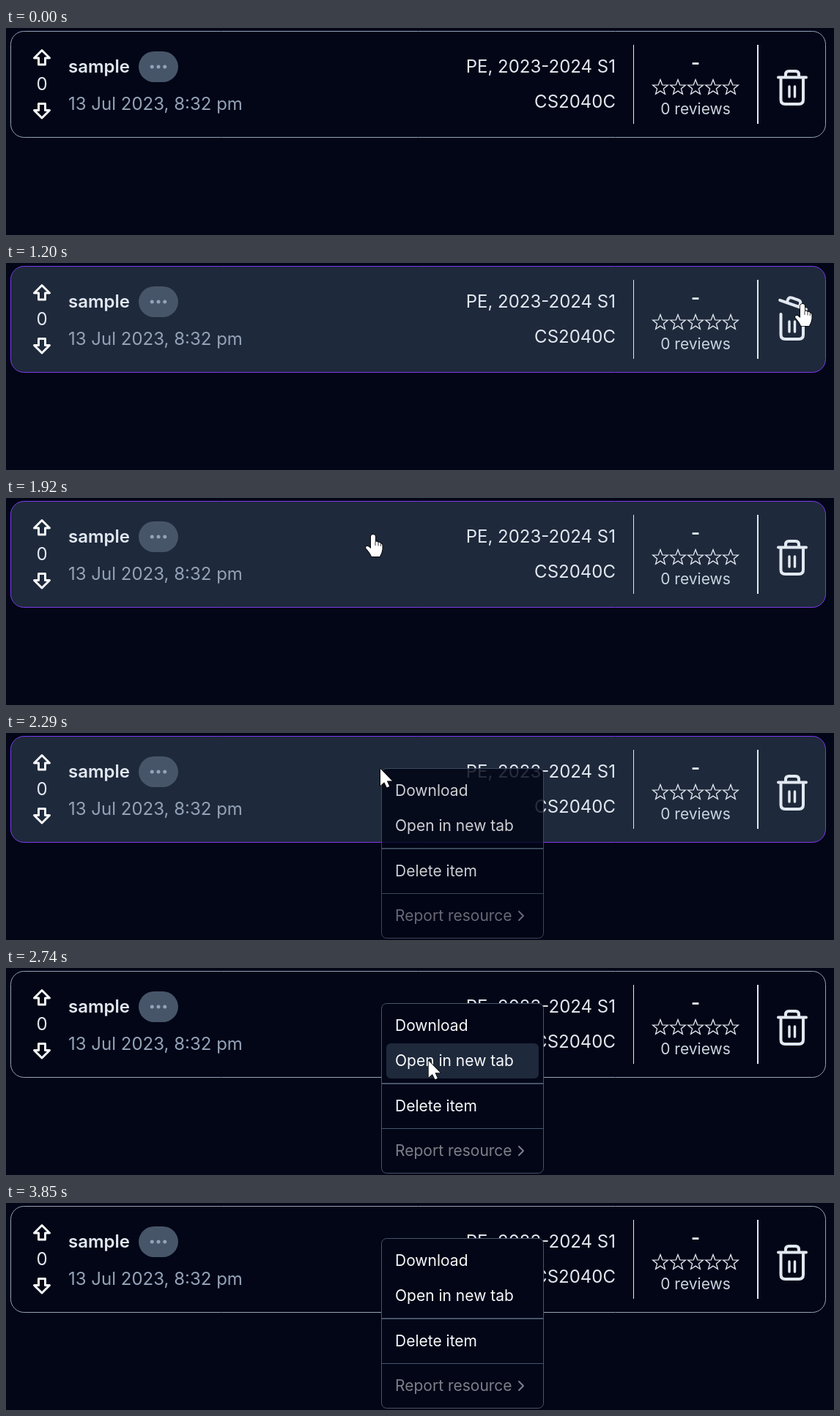
Animation, 1130 px wide and 283 px high, one loop 4.61 s. Source, as an HTML page with a canvas:

```html
<!DOCTYPE html>
<html lang="en">
<head>
<meta charset="utf-8">
<title>Resource card</title>
<style>
  html, body { margin: 0; width: 100%; height: 100%; overflow: hidden; background: #020617; }
  canvas { display: block; width: 1130px; height: 283px; }
</style>
</head>
<body>
<canvas id="stage"></canvas>
<script>
const W = 1130, H = 283, LOOP = 4610;
const canvas = document.getElementById('stage');
const ctx = canvas.getContext('2d');
const ratio = window.devicePixelRatio || 1;
canvas.width = Math.round(W * ratio);
canvas.height = Math.round(H * ratio);

const INK = '#f8fafc', SOFT = '#e2e8f0', MUTED = '#94a3b8', LINE = '#475569';
const BASE = [2, 6, 23], HOVER = [30, 41, 59];
const EDGE = [148, 163, 184], VIOLET = [124, 58, 237];

// Pointer path: time, x, y
const path = [
  [710, 969, 259], [790, 979, 200], [870, 996, 145], [960, 1035, 96],
  [1060, 1080, 66], [1200, 1087, 56], [1240, 1087, 56], [1330, 1060, 72],
  [1450, 900, 88], [1600, 740, 85], [1740, 637, 72], [1860, 520, 54],
  [1920, 501, 50], [2050, 501, 50], [2150, 504, 33], [2250, 511, 49],
  [2500, 511, 49], [2600, 521, 72], [2750, 580, 130], [2850, 611, 163],
  [2960, 622, 195], [3740, 622, 195], [3810, 624, 240], [3850, 625, 262]
];
const MENU_AT = 2260;

const menuItems = [
  { label: 'Download', top: 55, base: 86 },
  { label: 'Open in new tab', top: 103, base: 134 },
  { label: 'Delete item', top: 165, base: 196 }
];

const smooth = p => p * p * (3 - 2 * p);
const ramp = (t, start, length) => smooth(Math.min(1, Math.max(0, (t - start) / length)));
const mix = (a, b, p) => `rgb(${a.map((v, i) => Math.round(v + (b[i] - v) * p)).join(',')})`;

// Monotone cubic interpolation, so pauses stay still
function slope(i, k) {
  if (i < 1 || i >= path.length - 1) return 0;
  const rate = j => (path[j + 1][k] - path[j][k]) / (path[j + 1][0] - path[j][0]);
  const a = rate(i - 1), b = rate(i);
  return a * b <= 0 ? 0 : 2 * a * b / (a + b);
}

function pointer(t) {
  const last = path.length - 1;
  if (t < path[0][0] || t >= path[last][0]) return null;
  let i = 0;
  while (t >= path[i + 1][0]) i++;
  const span = path[i + 1][0] - path[i][0], u = (t - path[i][0]) / span;
  const at = k => {
    const a = path[i][k], b = path[i + 1][k];
    return a + (b - a) * smooth(u)
      + span * u * (1 - u) * ((1 - u) * slope(i, k) - u * slope(i + 1, k));
  };
  return { x: at(1), y: at(2) };
}

function text(str, x, y, size, color, weight = 400, align = 'left') {
  ctx.font = `${weight} ${size}px Inter, sans-serif`;
  ctx.textAlign = align;
  ctx.fillStyle = color;
  ctx.fillText(str, x, y);
}

function box(x, y, w, h, r, fill, stroke) {
  ctx.beginPath();
  ctx.roundRect(x, y, w, h, r);
  if (fill) { ctx.fillStyle = fill; ctx.fill(); }
  if (stroke) { ctx.strokeStyle = stroke; ctx.lineWidth = 1; ctx.stroke(); }
}

function bar(x, y, w, h, color) {
  ctx.fillStyle = color;
  ctx.fillRect(x, y, w, h);
}

function outline(d, x, y, scale, width, color) {
  ctx.save();
  ctx.translate(x, y);
  ctx.scale(scale, scale);
  ctx.lineCap = ctx.lineJoin = 'round';
  ctx.lineWidth = width;
  ctx.strokeStyle = color;
  ctx.stroke(new Path2D(d));
  ctx.restore();
}

function star(cx, cy) {
  ctx.beginPath();
  for (let i = 0; i < 10; i++) {
    const r = i % 2 ? 4.6 : 10.9, a = i * Math.PI / 5 - Math.PI / 2;
    ctx.lineTo(cx + r * Math.cos(a), cy + r * Math.sin(a));
  }
  ctx.closePath();
  ctx.lineJoin = 'miter';
  ctx.lineWidth = 1.3;
  ctx.strokeStyle = SOFT;
  ctx.stroke();
}

function trash(open) {
  outline('M1057.5 70V98Q1057.5 104 1063.5 104H1082Q1088 104 1088 98V70', 0, 0, 1, 4, SOFT);
  outline('M1069 80V94M1076.5 80V94', 0, 0, 1, 3.4, SOFT);
  ctx.save();
  ctx.translate(1092, 67.5 - 4 * open);
  ctx.rotate(open * 0.34);
  outline('M-38 0H0M-28 0V-4Q-28 -8.5 -23.5 -8.5H-14.5Q-10 -8.5 -10 -4V0', 0, 0, 1, 4, SOFT);
  ctx.restore();
}

function card(t) {
  const glow = ramp(t, 860, 240) - ramp(t, 2290, 240);
  box(6.5, 4.5, 1112, 145, 18, mix(BASE, HOVER, glow), mix(EDGE, VIOLET, glow));

  outline('M9 18v-6H5l7-7 7 7h-4v6H9z', 31, 23, 1.5, 2, INK);
  text('0', 49, 85, 24, SOFT, 400, 'center');
  outline('M15 6v6h4l-7 7-7-7h4V6h6z', 31, 94.5, 1.5, 2, INK);

  text('sample', 85, 61, 24, SOFT, 600);
  box(181, 32, 54, 42, 21, LINE);
  for (let i = -1; i <= 1; i++) box(205.5 + i * 8.75, 50.5, 5, 5, 2.5, MUTED);
  text('13 Jul 2023, 8:32 pm', 85, 112, 24, MUTED);

  text('PE, 2023-2024 S1', 832, 61, 24, SOFT, 400, 'right');
  text('CS2040C', 832, 109, 24, SOFT, 400, 'right');

  bar(856, 23, 1, 108, SOFT);
  bar(1025, 23, 2, 108, SOFT);
  text('-', 941, 57, 27, SOFT, 600, 'center');
  for (let i = 0; i < 5; i++) star(893 + i * 24, 81.5);
  text('0 reviews', 941, 118, 21, '#cbd5e1', 400, 'center');

  trash(ramp(t, 1000, 150) - ramp(t, 1335, 150));
}

function menu(t, p) {
  ctx.globalAlpha = 0.8 + 0.2 * ramp(t, MENU_AT, 150);
  box(512.5, 48.5, 221, 232, 7, mix(BASE, BASE, 0), LINE);
  for (const item of menuItems) {
    const hit = p && p.x > 519 && p.x < 727 && p.y >= item.top && p.y < item.top + 48;
    if (hit) box(519, item.top, 208, 48, 6, mix(HOVER, HOVER, 0));
    text(item.label, 531, item.base, 21, INK);
  }
  bar(513, 157, 220, 2, LINE);
  bar(513, 219, 220, 1, LINE);
  text('Report resource', 531, 257, 21, '#7d808a');
  outline('M700 244l6 6-6 6', 0, 0, 1, 2, '#7d808a');
  ctx.globalAlpha = 1;
}

const arrow = new Path2D('M0 0V23L5.2 18.2L8.8 25.6L12.2 24L8.8 16.6H16Z');
const hand = new Path2D('M-3 3Q-3 0 0 0Q3 0 3 3V10Q5.5 8.5 7 11Q9.5 10 10.3 12.5'
  + 'Q12.5 12 12.5 15V20Q12 25 9 30H-2Q-4 25 -9.5 19Q-11 15.5 -7 16L-3 19Z');

function cursor(p, pointing) {
  const shape = pointing ? hand : arrow;
  ctx.save();
  ctx.translate(p.x, p.y);
  ctx.lineJoin = 'round';
  ctx.lineWidth = 1.6;
  ctx.strokeStyle = '#000';
  ctx.stroke(shape);
  ctx.fillStyle = '#fff';
  ctx.fill(shape);
  if (pointing) {
    ctx.lineWidth = 0.8;
    ctx.stroke(new Path2D('M3 10V15M7 11V15.5M10.3 12.5V16'));
  }
  ctx.restore();
}

function draw(t) {
  ctx.setTransform(ratio, 0, 0, ratio, 0, 0);
  bar(0, 0, W, H, mix(BASE, BASE, 0));
  const p = pointer(t), menuOpen = t >= MENU_AT;
  card(t);
  if (menuOpen) menu(t, p);
  if (p) cursor(p, !menuOpen && p.y < 150);
}

const start = performance.now();
function tick() {
  draw((performance.now() - start) % LOOP);
  requestAnimationFrame(tick);
}
tick();
</script>
</body>
</html>
```
